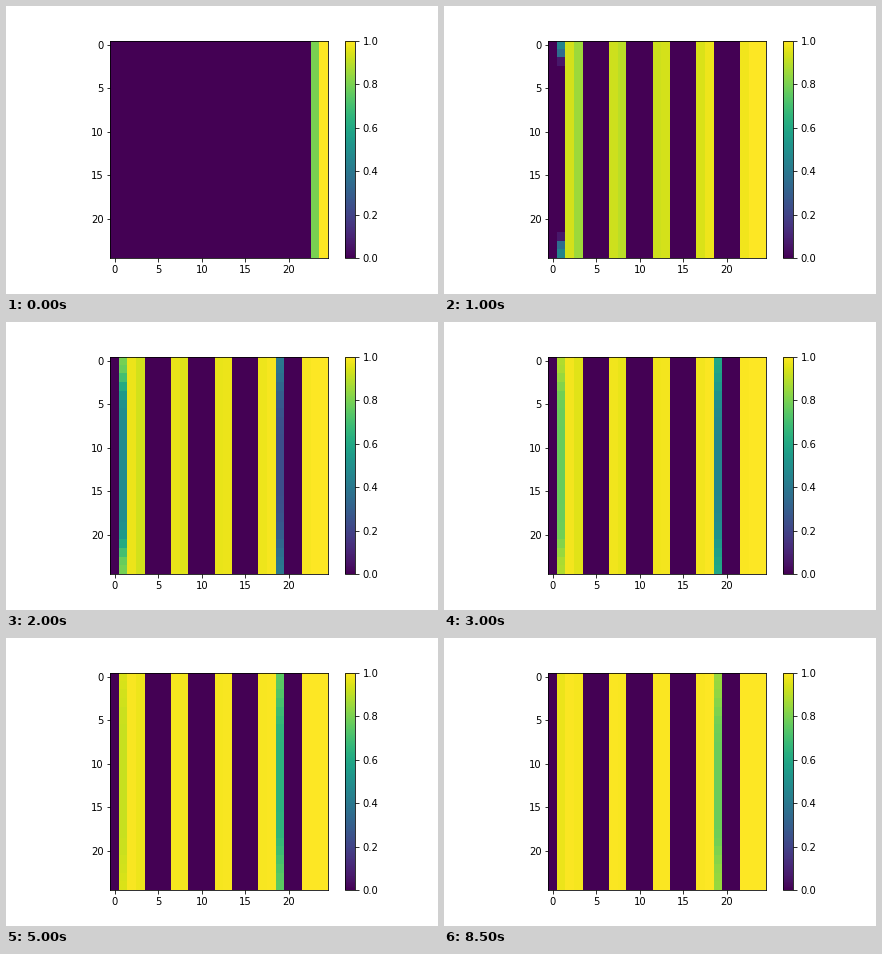
A matplotlib script that plays this animation: 432 px wide and 288 px high, repeating every 10 s.

```python
import numpy as np
import matplotlib.pyplot as plt
from matplotlib.animation import FuncAnimation

N = 25
FRAMES = 20
INTERVAL = 500

rows = np.arange(N)
depth = np.minimum(rows, N - 1 - rows)


def decay(step, scale, power):
    """Gap to 1.0, shrinking as a power of the step number."""
    return scale / step ** power


def blend(edge, middle, width):
    """Column of values whose gap goes from the edge rows to the middle."""
    weight = np.exp(-(depth / width) ** 2)
    gap = edge ** weight * middle ** (1 - weight)
    return np.clip(1 - gap, 0, 1)


def field(step):
    z = np.zeros((N, N))
    z[:, 23] = 1 if step else .8
    z[:, 24] = 1
    if step == 0:
        return z

    # Five bands, five columns apart, each two columns wide.
    for band in range(5):
        col = 2 + 5 * band
        first = .14 + .05 * band - .018 * band ** 2
        z[:, col] = 1 - decay(step, first, 1.15)
        if band < 4:
            second = .31 - .085 * band
            z[:, col + 1] = 1 - decay(step, second, 1.1)

    # Two slow columns that light up from the edge rows inwards.
    z[:, 1] = blend(decay(step, 1.45, 1.4), decay(step, 8.3, 2), 2.8)
    z[:, 19] = blend(decay(step, 2.25, .95), decay(step, 2.39, .826), 4)
    return z


plt.rcParams.update({"font.family": "DejaVu Sans", "font.size": 10})
fig = plt.figure(figsize=(6, 4), dpi=72, facecolor="white")
fig.subplots_adjust(left=.125, right=.9, bottom=.125, top=.88)
ax = fig.add_subplot()
image = ax.imshow(field(0), cmap="viridis", vmin=0, vmax=1,
                  interpolation="nearest")
ax.set_xticks(range(0, N, 5))
ax.set_yticks(range(0, N, 5))
fig.colorbar(image, ax=ax, ticks=np.linspace(0, 1, 6))


def draw(step):
    image.set_data(field(step))
    return (image,)


anim = FuncAnimation(fig, draw, frames=FRAMES, interval=INTERVAL,
                     init_func=lambda: draw(0), repeat=True, repeat_delay=0)
plt.show()
```
